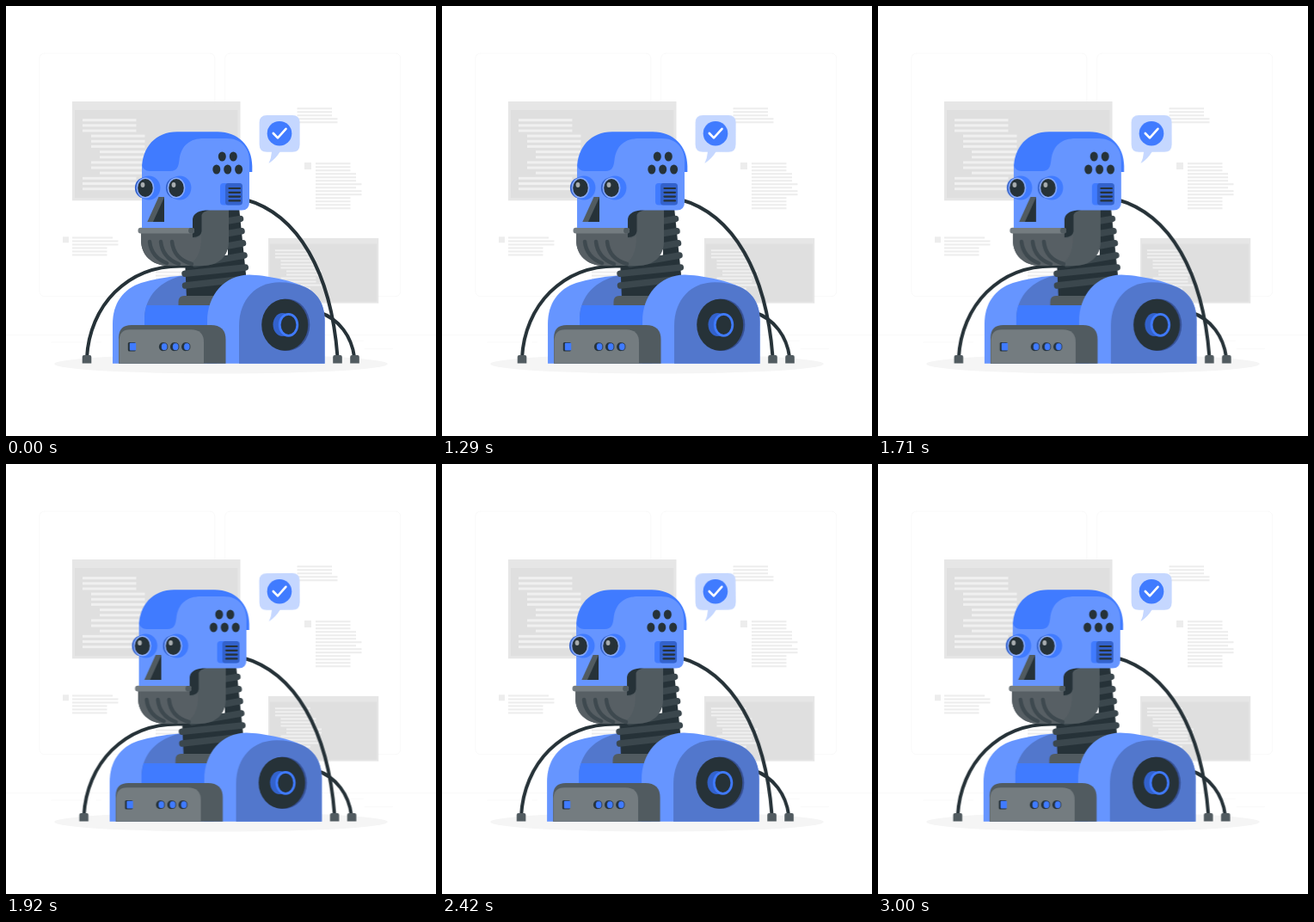
An HTML page for the animation above (3.04 s loop, 500 by 500 pixels).

```html
<!DOCTYPE html>
<html lang="en">
<head>
<meta charset="utf-8">
<title>Robot</title>
<style>
  html, body { margin: 0; width: 100%; height: 100%; overflow: hidden; background: #fff; }
  svg { display: block; width: 100vw; height: 100vh; }
  .blue { fill: #407bff; }
  .sky { fill: #6695ff; }
  .navy { fill: #5277cc; }
  .deep { fill: #3362cc; }
  .dark { fill: #263238; }
  .steel { fill: #515b60; }
  .silver { fill: #747c80; }
  .cable { fill: none; stroke: #263238; stroke-width: 4; stroke-linecap: round; }
  .rib { fill: none; stroke: #3e494f; stroke-width: 4.5; stroke-linecap: round; }
  .coil { stroke: #3b474d; stroke-width: 7.5; stroke-linecap: round; }
  .hair { fill: none; stroke: #ebebeb; stroke-width: .3; }

  /* One loop is 3040 ms; the shake starts after one second at 300 ms a step. */
  #robot { animation: shake 3040ms linear infinite; }
  #bubble { transform-origin: 318px 155px; animation: sway 3040ms linear infinite; }
  @keyframes shake {
    0%, 32.895% { transform: translateX(0); }
    42.763% { transform: translateX(-1px); }
    52.632% { transform: translateX(2px); }
    62.5% { transform: translateX(-4px); }
    72.368% { transform: translateX(4px); }
    82.237% { transform: translateX(-4px); }
    92.105% { transform: translateX(4px); }
    100% { transform: translateX(-2.4px); }
  }
  @keyframes sway {
    0%, 98.684% { transform: rotate(0deg); }
    24.671% { transform: rotate(1deg); }
    74.013% { transform: rotate(-1deg); }
    100% { transform: rotate(.053deg); }
  }
</style>
</head>
<body>
<svg viewBox="0 0 500 500">
  <defs>
    <g id="window">
      <rect width="195.5" height="115.3" fill="#e6e6e6"/>
      <rect x="3" y="10" width="189.5" height="102.3" fill="#dfdfdf"/>
      <g id="code" fill="#f0f0f0"></g>
    </g>
    <g id="eye">
      <ellipse class="blue" cx="4" rx="13.4" ry="14"/>
      <ellipse class="deep" cx="-1.5" rx="10.6" ry="12"/>
      <ellipse class="dark" rx="9.6" ry="11.2" stroke="#8aadff" stroke-width="1.6"/>
      <ellipse cx="-3" cy="-3.5" rx="2.4" ry="3" fill="#a8adaf"/>
    </g>
    <g id="knob">
      <ellipse class="dark" cx="-1.2" rx="4.4" ry="5"/>
      <ellipse class="blue" cx=".6" rx="3.7" ry="4.4" stroke="#263238" stroke-width=".8"/>
    </g>
    <path id="plug" class="steel" d="M-5.3 9.5V2q0-2 2-2H3.3q2 0 2 2V9.5Z"/>
    <ellipse id="hole" class="dark" rx="4.5" ry="5.5"/>
  </defs>

  <g class="hair">
    <rect x="38.8" y="55.1" width="204" height="282.5" rx="5.6"/>
    <rect x="254.7" y="55.1" width="204" height="282.5" rx="5.6"/>
    <path d="M0 382.5H500M416.8 398.6h33M322.5 401.3h8.7M396.6 389.3h19.2M52.5 391h43.2M104.6 391h6.3"/>
  </g>
  <use href="#window" x="77" y="111"/>
  <use href="#window" transform="translate(305 270) scale(.656)"/>
  <g id="notes" fill="#ededed">
    <rect x="347" y="182" width="8" height="8"/>
    <rect x="66" y="268.3" width="7" height="7"/>
  </g>
  <ellipse cx="250" cy="416.2" rx="193.9" ry="11.3" fill="#f5f5f5"/>

  <g id="bubble">
    <path fill="#c5d7ff" d="M303.5 127H333q8.6 0 8.6 8.6V161q0 8.8-8.6 8.8H318.5Q313 178.500 305.500 183Q308.500 177 309 169.800H303.500Q294.600 169.800 294.600 161V135.600Q294.600 127 303.500 127Z"/>
    <circle class="blue" cx="318" cy="148.200" r="14.300"/>
    <path d="M310.800 148l5.200 5.300L325.500 142.800" fill="none" stroke="#fff" stroke-width="2.600" stroke-linecap="round" stroke-linejoin="round"/>
  </g>

  <g id="robot">
    <path class="cable" d="M94 409C97 350 140 300 208 302.500"/>
    <path class="cable" d="M278 225C340 242 378 310 385.500 408"/>
    <path class="cable" d="M364 356C388 364 402 385 405 408"/>
    <use href="#plug" x="94" y="406"/>
    <use href="#plug" x="385.500" y="406"/>
    <use href="#plug" x="405.500" y="406"/>

    <!-- back and chest -->
    <path class="sky" d="M124 415.700V370C124 346 136 329 157 322Q178 315.500 205 313.500L245 330V415.700Z"/>
    <path class="navy" d="M161 372V362C162 338 178 319 208 313L245 325V372Z"/>
    <path class="blue" d="M161 372V362Q161.300 355 163.300 348H245V372Z"/>

    <!-- neck -->
    <path class="dark" d="M208 295L258 290V234H271L279 312V340H210Z"/>
    <g class="coil">
      <path d="M255 250.500L272.500 247.500M255 265L274 261.800M255 279.500L275.500 275.800M220 300L277 290M208 311.200L278.300 304M208.500 325L279 317"/>
    </g>
    <path class="steel" d="M200.500 348V344Q200.500 337 207 337H260V348Z"/>

    <!-- shoulder -->
    <path class="sky" d="M234 415.700V367C234 336 254 313 283 312.500C302 313 331 319 346 326C362 333 370.600 346 370.600 366V415.700Z"/>
    <path class="navy" d="M271 415.700V372C271 341 291 321.300 318 321.300Q334 321.300 348 327C362 333.500 370.600 346 370.600 366V415.700Z"/>
    <ellipse cx="326.300" cy="370.800" rx="27" ry="30.300" fill="#375194"/>
    <ellipse class="dark" cx="324.200" cy="370.800" rx="27" ry="30"/>
    <ellipse class="deep" cx="321.500" cy="370.500" rx="11" ry="13.500"/>
    <ellipse class="dark" cx="328.500" cy="370.800" rx="10.300" ry="12.500" stroke="#407bff" stroke-width="2.800"/>

    <!-- control box -->
    <path class="steel" d="M131 415.700V386Q131 371 146 371H238Q255.500 371 255.500 388V415.700Z"/>
    <path class="silver" d="M131.500 415.700V389Q132 376.300 144 376.300H215Q230 376.300 230 391V415.700Z"/>
    <rect class="dark" x="141.800" y="391" width="9" height="10.400" rx="1.500"/>
    <rect class="blue" x="143.800" y="391.800" width="7.400" height="8.800" rx="1"/>
    <use href="#knob" x="183.500" y="396.200"/>
    <use href="#knob" x="196.600" y="396.200"/>
    <use href="#knob" x="209.700" y="396.200"/>

    <!-- jaw -->
    <path class="steel" d="M157 262H217L227 242Q231 237 238 237H259V274C259 291 247 302 229 302H189C170 302 157 290 157 272Z"/>
    <path d="M157 263H217V270Q223 271 227 266Q228 300 205 302H189C170 302 157 290 157 272Z" fill="#575f64"/>
    <g class="rib">
      <path d="M167 274Q169 292 187 299M180 274Q182 293 201 300M193 274Q195 294 216 300"/>
    </g>
    <path class="dark" d="M216.500 236H245Q229 237.500 227.500 243V262Q226.500 269 217 269Z"/>
    <rect class="silver" x="153.500" y="257.800" width="65.500" height="6.800" rx="3"/>
    <ellipse class="steel" cx="215.500" cy="261.200" rx="3.400" ry="3.400"/>

    <!-- head -->
    <path class="blue" d="M158 190C158 164 174 146.300 199 146.300H246C270 146.300 286.300 163 286.300 186V193H270L158 200Z"/>
    <path class="sky" d="M158 185Q160 192 167 192H191C199 192 200.500 187 201.500 179C203.500 162 214 154 230 154H257C273 154 283 165 283 180V228Q283 237.500 274 237.500H232Q217 239 217 249V258H158Z"/>
    <use href="#hole" x="251.300" y="175"/>
    <use href="#hole" x="264.300" y="175"/>
    <use href="#hole" x="244.800" y="190"/>
    <use href="#hole" x="257.700" y="190"/>
    <use href="#hole" x="270.600" y="190"/>
    <rect class="blue" x="249" y="206" width="25" height="25.500" rx="4"/>
    <rect class="deep" x="255" y="206" width="20" height="25.500" rx="3.500"/>
    <path d="M259.500 212H272M259.500 216.800H272M259.500 221.600H272M259.500 226.400H272" stroke="#263238" stroke-width="2.200" stroke-linecap="round"/>
    <use href="#eye" x="162" y="211.500"/>
    <use href="#eye" x="198" y="211.500"/>
    <path class="steel" d="M164.300 251L177.500 222H184V251Z"/>
    <path class="dark" d="M171 251L184 222.500V251Z"/>
  </g>
</svg>
<script>
  const addBar = (parent, x, y, w, h) => {
    const bar = document.createElementNS("http://www.w3.org/2000/svg", "rect");
    Object.entries({ x, y, width: w, height: h }).forEach(([k, v]) => bar.setAttribute(k, v));
    parent.append(bar);
  };
  const code = document.getElementById("code");
  [..."00011122112000"].forEach((indent, i) =>
    addBar(code, 12 + indent * 10, 20.2 + i * 6.15, 62.5, 3));

  const notes = document.getElementById("notes");
  const paragraph = (x, y, widths) =>
    widths.forEach((w, i) => addBar(notes, x, y + i * 4, w, 2.1));
  paragraph(338.5, 118.2, [40.5, 40.5, 40.5, 47, 47]);
  paragraph(360, 182.2, [40.5, 40.5, 40.5, 47, 47, 47, 53.5, 47, 53.5, 53.5, 40.5, 40.5, 40.5, 40.5]);
  paragraph(77, 268.4, [47, 53.5, 53.5, 40.5, 40.5, 40.5]);
  paragraph(174, 308.5, [40.5, 40.5, 40.5]);
</script>
</body>
</html>
```
